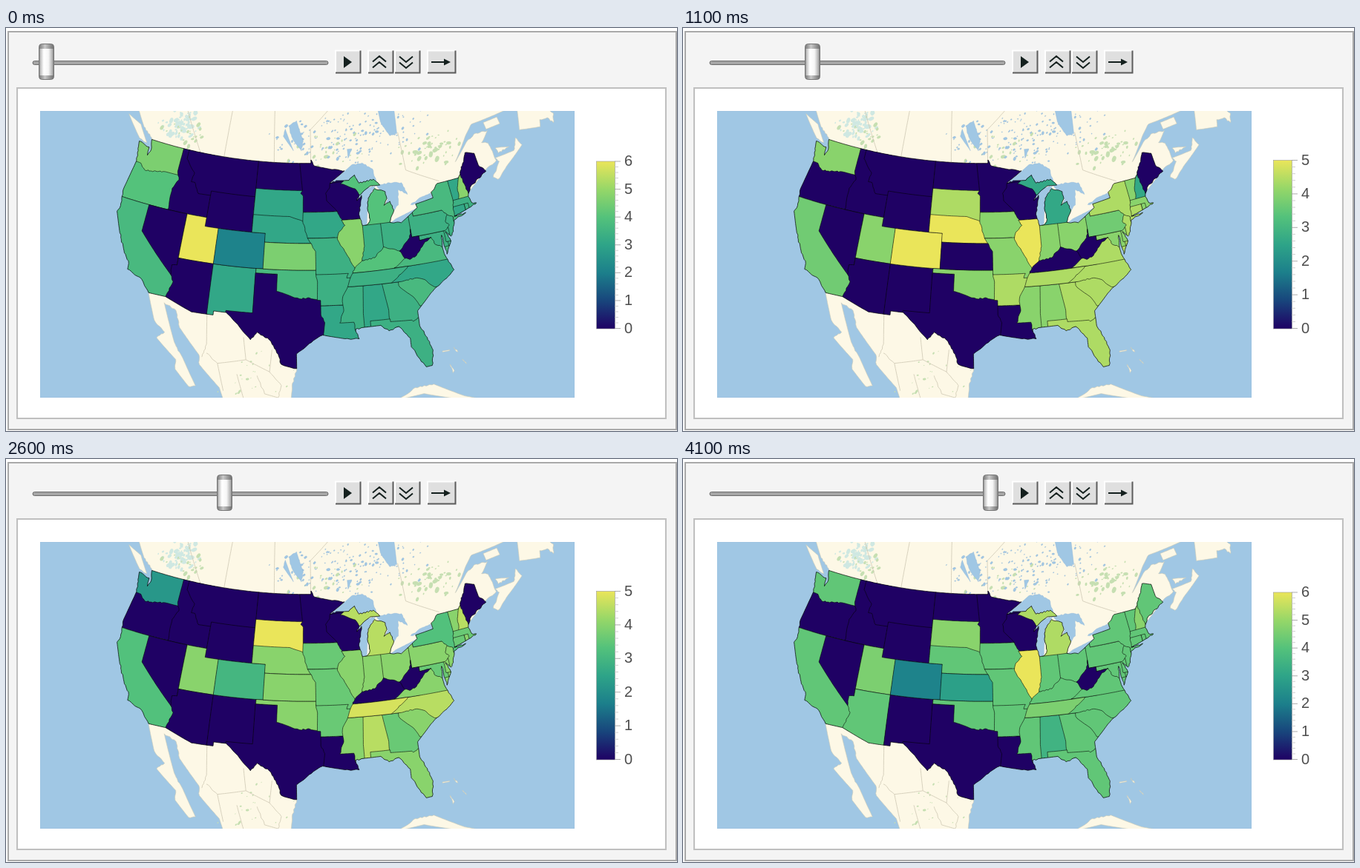
Recreate the animation shown at these times as an HTML page. Size 904 px wide and 544 px high, loop 4500 ms.

```html
<!DOCTYPE html>
<html lang="en">
<head>
<meta charset="utf-8">
<title>State values map</title>
<style>
html, body { margin: 0; width: 100%; height: 100%; overflow: hidden; background: #fff; }
svg { display: block; }
text { font: 20px "Liberation Sans", Arial, sans-serif; fill: #4d4d4d; }
#states path, #border { stroke: #000; stroke-opacity: .7; stroke-width: .8; stroke-linejoin: round; }
#border { fill: none; stroke-width: 1; }
.land { fill: #fdf8e6; stroke: #c9c9b8; stroke-width: .6; }
.water { fill: #a0c7e4; stroke: #8fb4d6; stroke-width: .4; }
.line { fill: none; stroke: #cfc8b4; stroke-width: .8; }
.wood { fill: #c6dfb2; }
.ice { fill: #cfe8e2; }
.icon { fill: none; stroke: #14201e; stroke-width: 2; }
</style>
</head>
<body>
<svg width="904" height="544" viewBox="0 0 904 544">
  <defs>
    <clipPath id="frame"><path d="M46 112H766V499H46Z"/></clipPath>
    <clipPath id="nation"></clipPath>
    <linearGradient id="scale" x1="0" x2="0" y1="1" y2="0"></linearGradient>
    <linearGradient id="metal">
      <stop offset="0" stop-color="#b4b4b4"/><stop offset=".3" stop-color="#fff"/>
      <stop offset=".65" stop-color="#f6f6f6"/><stop offset="1" stop-color="#a2a2a2"/>
    </linearGradient>
    <linearGradient id="cap">
      <stop offset="0" stop-color="#777"/><stop offset=".4" stop-color="#c9c9c9"/><stop offset="1" stop-color="#6e6e6e"/>
    </linearGradient>
  </defs>
  <rect x="3" y="5" width="900" height="537" fill="#f4f4f4" stroke="#a9a9a9" stroke-width="2"/>
  <rect x="15" y="81" width="874" height="446" fill="#fff" stroke="#bfbfbf" stroke-width="2"/>
  <rect x="36" y="44.5" width="398" height="5" rx="2.5" fill="#a6a6a6" stroke="#6c6c6c"/>
  <g id="thumb">
    <rect x="-10" y="21.5" width="20" height="48" rx="4" fill="url(#cap)" stroke="#777"/>
    <rect x="-9" y="28" width="18" height="36" fill="url(#metal)"/>
  </g>
  <g id="buttons"></g>
  <path d="M455 38L466 46L455 54Z" fill="#14201e"/>
  <path class="icon" d="M494 45.500l9-7.500l9 7.500m-18 8l9-7.500l9 7.500M530 38.500l9 7.500l9-7.500m-18 8l9 7.500l9-7.500M573 46h19"/>
  <path d="M590 41.500L599 46L590 50.500Z" fill="#14201e"/>
  <g clip-path="url(#frame)">
    <path class="water" d="M46 112H766V499H46Z"/>
    <g id="base"></g>
    <g id="states" clip-path="url(#nation)"></g>
    <path id="border"/>
  </g>
  <g id="legend"></g>
</svg>
<script>
const $ = id => document.getElementById(id);
const RAD = Math.PI / 180, SIN0 = Math.sin(38 * RAD), COS0 = Math.cos(38 * RAD);

function add(parent, tag, attrs) {
  const el = document.createElementNS('http://www.w3.org/2000/svg', tag);
  for (const key in attrs) el.setAttribute(key, attrs[key]);
  return parent.appendChild(el);
}

// Lambert azimuthal equal-area, centred on 96W 38N
function project(west, lat) {
  const l = (96 - west) * RAD, s = Math.sin(lat * RAD), c = Math.cos(lat * RAD), cl = Math.cos(l);
  const k = 690 * Math.sqrt(2 / (1 + SIN0 * s + COS0 * c * cl));
  return (404.2 + k * c * Math.sin(l)).toFixed(1) + ' ' + (315 - k * (COS0 * s - SIN0 * c * cl)).toFixed(1);
}

// Points are "west lat" pairs; two points alone mean a box of parallels and meridians.
// Short oblique edges (rivers, coasts) get a wobble that depends on place only.
function outline(text, closed = true) {
  return text.split('/').map(part => {
    let n = part.trim().split(/\s+/).map(Number);
    if (n.length === 4 && closed) n = [n[0], n[1], n[2], n[1], n[2], n[3], n[0], n[3]];
    const pts = [], count = n.length / 2;
    for (let i = 0; i < count; i++) {
      const j = (i + 1) % count, x = n[2 * i], y = n[2 * i + 1];
      const dx = n[2 * j] - x, dy = n[2 * j + 1] - y, len = Math.hypot(dx, dy);
      const amp = len < 2.5 && Math.abs(dx) > .06 && Math.abs(dy) > .06 ? .06 : 0;
      const steps = closed || j ? Math.ceil(len / .3) : 1;
      for (let s = 0; s < steps; s++) {
        const u = x + dx * s / steps, v = y + dy * s / steps, a = s ? amp : 0;
        pts.push(project(u + a * Math.sin(40 * u + 23 * v), v + a * Math.cos(31 * u - 37 * v)));
      }
    }
    return 'M' + pts.join('L') + (closed ? 'Z' : '');
  }).join('');
}

const base = (cls, text) => add($('base'), 'path', { class: cls, d: outline(text, cls !== 'line') });

// Canada, then its islands
base('land', '128 52.5 125 50.2 123.2 49.3 122.7 49 118 46 84 41 75 41 67.1 44.9 64.8 45.5 64.9 46.9 65 47.6 66 47.9 64.3 48.9 66.5 49.1 68.4 48.5 71.2 46.8 68.3 49.1 66.4 50.2 60 50.2 55 53 75 60 128 60');
base('land', '64.8 45.8 61.5 45.8 60.4 47 59.9 46 63.6 44.5 65.6 43.5 66.2 43.9 64.4 45.3 / 59.2 47.6 55.8 46.9 55.3 47.6 54 47.4 53.5 46.6 52.7 47.5 54 49.4 55.6 51.6 57.2 51 / 64.2 46.8 62 46.4 64 46.2 / 64.4 49.9 61.8 49.1 / 128.2 50.8 125.5 50.2 123.4 48.5 124.8 48.7');
// Mexico, Cuba, Bahamas
base('land', '117.1 32.5 115.7 29.7 114.1 28.6 115 27.8 112.2 25.8 112.1 24.7 110.2 23 109.4 23.2 111.3 26 112.7 27.7 114.8 31.8 113.1 31.2 112.3 29.4 109.4 26.7 109.2 25.6 106.5 23.3 105 20 97 20 97.8 22 97.7 24 97.15 25.9 100 30 106 33');
base('land', '84.9 21.9 82.8 23 80.5 23.1 77 21.2 74.5 20.3 77.5 20 78.5 21.2 81.8 22.2 / 78.9 26.6 78 26.5 / 77.4 26.8 77 26.2 77.2 26.3 / 78.2 25 77.8 24.2 78 24 / 76.6 25.3 76.2 24.7 76.4 25');

// Small lakes, forests and snow fields spread around a centre
let seed = 7;
const rnd = () => (seed = seed * 16807 % 2147483647) / 2147483647;
function scatter(cls, count, west, lat, spreadX, spreadY, size) {
  for (let i = 0; i < count; i++) {
    const [x, y] = project(west + spreadX * (rnd() - rnd()), lat + spreadY * (rnd() - rnd())).split(' ');
    const r = size * (.3 + rnd() * rnd());
    add($('base'), 'ellipse', { class: cls, cx: x, cy: y, rx: r * 1.6, ry: r, transform: `rotate(${-80 * rnd()} ${x} ${y})` });
  }
}
scatter('ice', 70, 119, 51.5, 4, 2, 2.5);
scatter('wood', 25, 117, 51, 5, 2, 2);
scatter('wood', 55, 75, 49, 6, 2.5, 2.5);
scatter('wood', 25, 92, 50.5, 9, 2, 2);
scatter('water', 170, 88, 52, 17, 3.5, 1.3);
scatter('wood', 25, 102, 25, 5, 4, 1.5);

// Provinces and Mexican states
base('line', '120 55 116 51 114.1 49 / 110 55 110 49 / 102 55 101.4 49 / 95.2 49 95.2 52.8 90 56 / 74.6 45.2 79.5 47.2 79.5 51.5');
base('line', '109 31.3 108.6 28 109 26.5 / 108.5 27 107 26 106 23 / 104 29.2 103.5 26.7 107 26 / 103.5 26.7 100.5 25.5 100.3 28 / 102 25 101 23 98 22.3 / 104.5 25 103 21 / 100.5 25.5 99 24 99.5 22');
// Bay and lakes
base('water', '82.3 55.5 82.2 53 81 51.3 79.7 51.4 79 55.5 / 96.8 50.4 96.5 51.5 97.8 53.8 99.2 53.2 98.6 52 / 98.2 50.4 99.8 52.8 100.1 52 / 88.8 49.4 88 50.4 88.8 50.4');
base('water', '92.1 46.7 88.3 48.6 86.5 48.7 84.9 47.9 84.6 46.4 90.8 46.8 / 87.5 41.6 88 43 87.5 44.5 88 44.5 87 45.8 84.7 46 86.3 44.6 86.9 41.6');
base('water', '84.7 46 83.2 44.3 83.9 43.6 82.4 43 81.7 43.5 81.3 45.2 80 44.5 80.6 45.9 82.5 46.1 / 83.5 41.6 81.7 41.4 79 42.8 82.5 42 / 79.8 43.3 77.5 43.2 76.2 43.5 76.4 44.1 78 43.9');

const NORTH = '124.7 48.4 122.75 48.1 122.6 47.2 122.3 47.9 122.76 49 95.15 49 95.15 49.38 94.6 48.7 92 48.3 89.6 48 92.1 46.75 90.8 46.95 89 46.9 88 47.45 87.4 46.5 85 46.75 84.1 46 85.6 46.05 87.6 45.1 88 44.55 87.2 45.1 87.9 43 87.5 41.7 86.8 41.76 86.3 42.3 86.5 43.6 86.2 44.7 85 45.7 83.4 45.2 83.3 44.4 83.9 43.7 82.9 44.05 82.5 43 83.4 41.73 81.7 41.5 78.9 42.85 79.05 43.27 76.2 43.55 76.3 44.2 75 45 71.5 45 70.3 46.2 69.2 47.45 67.8 47.07 67.8 45.7 66.95 44.8';
const ATLANTIC = '69 44.1 70.2 43.6 70.85 42.7 70.6 41.95 69.95 41.8 71.2 41.5 73.7 41 71.9 41.07 73.9 40.6 74.4 39.4 74.9 38.95 75.5 39.6 75.05 38.45 76 37.1 76.2 39.3 76.4 38.2 76.3 37 75.5 35.25 76.5 34.65 77.9 33.9 79.2 33.2 81.3 31.5 81.3 29.8 80.55 28.4 80.05 26.9 80.4 25.2 81.15 25.15 81.8 26.1 82.7 27.6 82.7 28.6 84 30.05 85.3 29.7 86.3 30.4';
const GULF = '88.4 30.35 89.6 30.2 89.2 29.1 91 29.2 93.85 29.7 95.3 28.9 97.2 27.6 97.15 25.95 99.1 26.4 99.5 27.5 100.7 29.1 102.3 29.88 103.1 28.98 104.9 30.6 106.5 31.78 108.2 31.78 108.2 31.33 111.07 31.33 114.8 32.5 117.12 32.53';
const PACIFIC = '118.4 33.8 120.6 34.5 120.65 35.15 121.9 36.6 123 38.1 124.35 40.3 124.1 41 124.5 42.85 124 46.25';
const nation = outline([NORTH, ATLANTIC, GULF, PACIFIC].join(' '));
add($('nation'), 'path', { d: nation });
$('border').setAttribute('d', nation);

// Painted in order inside the nation: a state runs past the borders that later ones cover
const states = {};
const state = (name, text) => states[name] = add($('states'), 'path', { d: outline(text) });
state('WA', '126 50 116 45');
state('OR', '126 46.25 123.2 46.15 122.25 45.55 121.2 45.65 118.98 46 115 46 115 42 126 42');
state('CA', '126 42 114 32');
state('ID', '117.03 50 117.03 46.4 116.5 45.5 117.2 44.4 117.03 42 111 42 111 50');
state('MT', '116.05 50 116.05 48 114.3 46.65 114.5 45.6 113.9 45.6 113 44.45 111.05 44.5 104 44.5 104 50');
state('NV', '120 42 114.04 42 114.04 35 114.63 35 120 39');
state('UT', '114.04 42 109 37');
state('WY', '111.05 45 104.05 41');
state('AZ', '114.04 37 109 37 109 31 115 31 114.72 32.72 114.15 34.3 114.63 35 114.75 36.1 114.04 36.2');
state('NM', '109.05 37 103 31');
state('CO', '109.05 41 102 37');
state('TX', '103.05 36.5 93 36.5 93 25 106.6 25 106.6 32 103.05 32');
state('OK', '103 37 94 37 94 33.64 95.5 33.9 96.9 33.8 98.1 34.1 100 34.56 100 36.5 103 36.5');
state('ND', '104.05 50 95 45');
state('SD', '104.05 45.94 96 42');
state('NE', '104.05 43 98.5 43 96.5 42.5 94 42.5 94 40 102.05 40 102.05 41 104.05 41');
state('KS', '102.05 40 94 37');
state('MN', '97.23 50 96.56 45.94 96.85 45.6 96.45 45.3 96.45 43.5 88 43.5 88 50');
state('WI', '92.1 46.7 92.3 46.1 92.87 45.6 92.75 44.75 91.2 43.5 90.65 42.5 86 42.5 86 47');
state('IA', '96.45 43.5 91.2 43.5 90.15 41.9 91.4 40.4 91.75 40.58 95.77 40.58 96.5 42.5');
state('LA', '94.04 33 88 33 88 28 94 28 93.55 31.1 94.04 32');
state('AR', '94.6 36.6 88 36.6 88 33 94.04 33 94.04 33.6 94.48 33.64 94.43 35.4');
state('MO', '95.77 40.58 88 40.58 88 36 90.37 36 90.1 36.5 94.62 36.5 94.62 39.1');
state('MS', '90.3 35 91.1 33.7 91 32.4 91.6 31 89.75 31 89.6 30 88 30 88 35');
state('AL', '88.2 35 88.45 31.9 88.4 30 84 30 84 35');
state('GA', '85.6 35 85.1 32.2 85 30 80 30 80 35');
state('SC', '83.35 35 83.35 34.6 81.5 33 80.9 32 78 32 78 36');
state('FL', '87.6 31 87.6 24 79 24 79 30.7 81.45 30.7 82.05 30.4 82.2 30.57 85 30.7 85 31');
state('NC', '84.3 35 83.1 35 81.05 35.15 79.7 34.8 78.55 33.8 75 33.5 75 37 84 37');
state('IL', '90.65 42.5 90.15 41.9 91.1 41.2 91.4 40.4 90.15 38.6 89.15 37 86 37 86 42.5');
state('IN', '87.53 42 87.53 39.4 88.05 37.8 84 37.5 84 42');
state('OH', '84.8 42 80 38');
state('MI', '90.4 46.55 88 48 82 48 82 41.73 87.2 41.73 87.2 44.8 88.1 45.9');
state('KY', '89.5 36.5 89.15 37 88.05 37.8 86.2 38 84.8 39.1 82.6 38.4 80 38 80 36.6');
state('VA', '83.68 36.6 82 37.5 80 40 75 40 75 36.55');
state('TN', '90.3 35 89.5 36.5 81.68 36.6 83.1 35.75 84.3 35');
state('MD', '79.48 39.72 75 39.72 75 38 76.3 37.95 77.3 38.4 77.75 39.3 79.48 39.2');
state('NJ', '75.5 41.4 73.9 38');
state('DE', '75.75 40 75 38.46');
state('PA', '80.52 43 80.52 39.72 75.5 39.72 74.75 40.2 75.2 40.7 74.7 41.36 74.7 42 79.76 42 79.76 43');
state('WV', '80.52 40.64 80.85 39.7 82.6 38.4 82 37.5 81.3 37.3 80.3 37.6 78.9 38.8 77.75 39.3 79.48 39.2 79.48 39.72 80.52 39.72');
state('NY', '79.76 42 75.35 42 74.7 41.36 73.9 41 74 40.5 71 40.5 71 46 80 46');
state('VT', '73.35 46 73.27 42 70 42 70 46');
state('NH', '71.5 46 71.5 45 72.1 44 72.46 42 70 42 70 46');
state('ME', '71.1 48 71.1 45.3 70.7 43 66 43 66 48');
state('MA', '73.3 42.75 69 42.75 69 41.3 73.5 41.3 73.5 42.05');
state('CT', '73.5 42.05 71.8 42.05 71.8 41.3 73.7 41');
state('RI', '71.8 42.05 71.2 41.2');

// Bevelled buttons: left edge and width
for (const [x, w] of [[444, 34], [488, 34], [524, 34], [568, 38]]) {
  add($('buttons'), 'path', { d: `M${x} 30h${w}v31h${-w}Z`, fill: '#dfdfdf' });
  add($('buttons'), 'path', { d: `M${x} 61v-30.500h${w}`, fill: 'none', stroke: '#fff', 'stroke-width': 2 });
  add($('buttons'), 'path', { d: `M${x} 60.500h${w - .5}v-30`, fill: 'none', stroke: '#5c5c5c', 'stroke-width': 2 });
}

const ramp = [[31, 1, 100], [24, 69, 124], [28, 127, 139], [46, 164, 136], [84, 194, 123], [150, 215, 104], [234, 229, 90]];
function colour(f) {
  const i = Math.min(5, Math.floor(f * 6)), t = f * 6 - i;
  return `rgb(${ramp[i].map((c, n) => Math.round(c + (ramp[i + 1][n] - c) * t))})`;
}
ramp.forEach((c, i) => add($('scale'), 'stop', { offset: i / 6, 'stop-color': `rgb(${c})` }));

function drawLegend(max) {
  const g = $('legend'), top = max === 6 ? 180 : 178.5, unit = (405.5 - top) / max;
  g.replaceChildren();
  add(g, 'rect', { x: 795.5, y: top, width: 25, height: 406 - top, fill: 'url(#scale)', stroke: '#999', 'stroke-width': .6 });
  for (let i = 0; i <= max * 5; i++) {
    const y = 405.5 - i * unit / 5, major = i % 5 === 0;
    add(g, 'path', { d: `M820 ${y}h${major ? 8 : 5}`, stroke: major ? '#999' : '#c4c4c4', 'stroke-width': .8 });
    if (major) add(g, 'text', { x: 833, y: y + 6 }).textContent = i / 5;
  }
}

// Each stop: common value in tenths, and the states that stand apart from it
const ALWAYS_ZERO = 'ID MT WY NV ND MN TX WV';
const stops = [
  { start: 0, max: 6, common: 34, apart: { 60: 'UT', 48: 'IL NH', 46: 'WA KS', 40: 'OR KY MI', 37: 'CA OK SC VA NY', 31: 'NM SD NE IA LA AL NC VT CT', 21: 'CO', 0: 'AZ WI ME' } },
  { start: 400, max: 5, common: 40, apart: { 46: 'CA KS NH NC', 42: 'WA', 35: 'MO MI', 31: 'UT SD MS NY WI', 0: 'OR CO AZ NM LA KY IL ME' } },
  { start: 1100, max: 5, common: 40, apart: { 50: 'CO NE IL', 44: 'SD AR FL SC NC TN VA NY NJ CT GA', 37: 'CA PA', 26: 'MI NH', 0: 'OR AZ NM KS LA KY WI ME' } },
  { start: 1900, max: 5, common: 34, apart: { 50: 'NE MO IL', 40: 'WA CA IA SC NH CT', 36: 'TN FL OH PA NJ MD OK', 32: 'SD MI', 29: 'OR UT CO AL NC', 0: 'AZ NM KS LA KY WI ME' } },
  { start: 2600, max: 5, common: 40, apart: { 50: 'SD', 48: 'TN', 45: 'MI AL NH NC', 36: 'IA MO AR GA MA CT MD', 33: 'CA NY', 30: 'CO', 22: 'WA', 0: 'OR AZ NM LA KY WI ME' } },
  { start: 3400, max: 6, common: 45, apart: { 60: 'NM IL', 51: 'MI', 48: 'CO NE MO AL CT', 42: 'WA MS TN NY VT', 39: 'AZ IA NC FL NH', 26: 'UT', 21: 'KS', 0: 'OR LA KY WI ME' } },
  { start: 4100, max: 6, common: 42, apart: { 60: 'IL', 53: 'MI', 48: 'SD NH', 46: 'UT TN', 35: 'AL', 29: 'KS', 21: 'CO', 0: 'OR NM LA WI' } },
];

function show({ max, common, apart }, index) {
  const paint = (names, tenths) => names.forEach(name => states[name].setAttribute('fill', colour(tenths / 10 / max)));
  paint(Object.keys(states), common);
  paint(ALWAYS_ZERO.split(' '), 0);
  for (const tenths in apart) paint(apart[tenths].split(' '), tenths);
  $('thumb').setAttribute('transform', `translate(${54.5 + 60 * index})`);
  drawLegend(max);
}

let shown = -1;
function tick(now) {
  const t = now % 4500, index = stops.filter(s => s.start <= t).length - 1;
  if (index !== shown) show(stops[shown = index], index);
  requestAnimationFrame(tick);
}
tick(performance.now());
</script>
</body>
</html>
```
